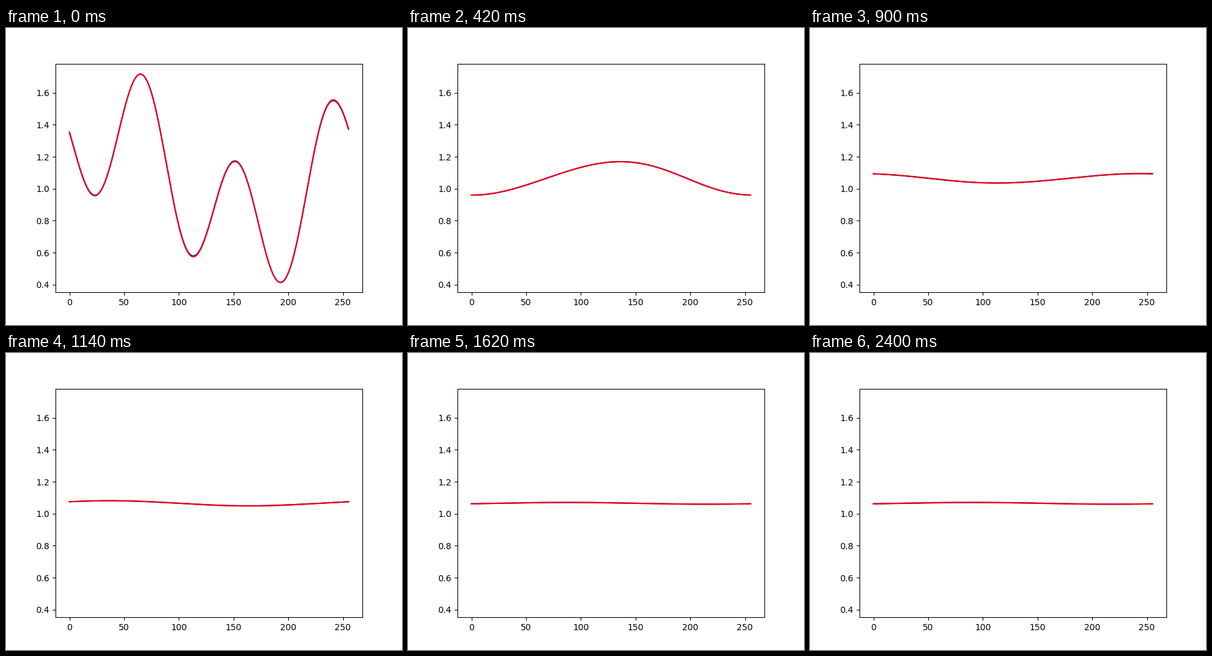
Animation of 640x480 px, one loop 2.46 s. Source, as a matplotlib script:

```python
import numpy as np
import matplotlib.pyplot as plt
from matplotlib.animation import FuncAnimation

N = 256
FRAMES = 41
DT = 0.05
NU = 0.08
MEAN = 1.065
SLOW_START, STILL = 16, 26
SLOW_SPAN = 13.7

x = np.arange(N)
wave = 2 * np.pi * np.arange(N // 2 + 1)

# (mode, amplitude, crest position) of the starting profile
MODES = [(1, 0.318, 37.5), (3, 0.409, 67.1)]


def angle(mode, crest):
    return 2 * np.pi * mode * (x - crest) / N


# Cole-Hopf transform turns the viscous Burgers equation into the heat equation
potential = sum(a * np.sin(angle(m, c)) / (2 * np.pi * m) for m, a, c in MODES)
phi_hat = np.fft.rfft(np.exp(-potential / (2 * NU)))


def drift(n):
    """Steps travelled: constant speed, then easing to a stop."""
    late = np.clip(n - SLOW_START, 0, SLOW_SPAN)
    return min(n, SLOW_START) + late - late ** 2 / (2 * SLOW_SPAN)


def solution(n):
    decay = np.exp(-NU * wave ** 2 * DT * min(n, STILL))
    shift = np.exp(-1j * wave * MEAN * DT * drift(n))
    hat = phi_hat * decay * shift
    phi = np.fft.irfft(hat, N)
    slope = np.fft.irfft(1j * wave * hat, N)
    return MEAN - 2 * NU * slope / phi


def model_error(n):
    early = 0.005 * np.exp(-n) * np.cos(angle(1, 110))
    return early + 0.001 * np.cos(angle(1, 180))


fig, ax = plt.subplots(figsize=(6.4, 4.8), dpi=100)
ax.set_xlim(-12.75, 267.75)
ax.set_ylim(0.3515, 1.7825)
exact, = ax.plot([], [], color="blue", lw=1.5)
model, = ax.plot([], [], color="red", lw=1.5)


def update(n):
    u = solution(n)
    exact.set_data(x, u)
    model.set_data(x, u - model_error(n))
    return exact, model


anim = FuncAnimation(fig, update, frames=FRAMES, interval=60, repeat=True)
plt.show()
```
